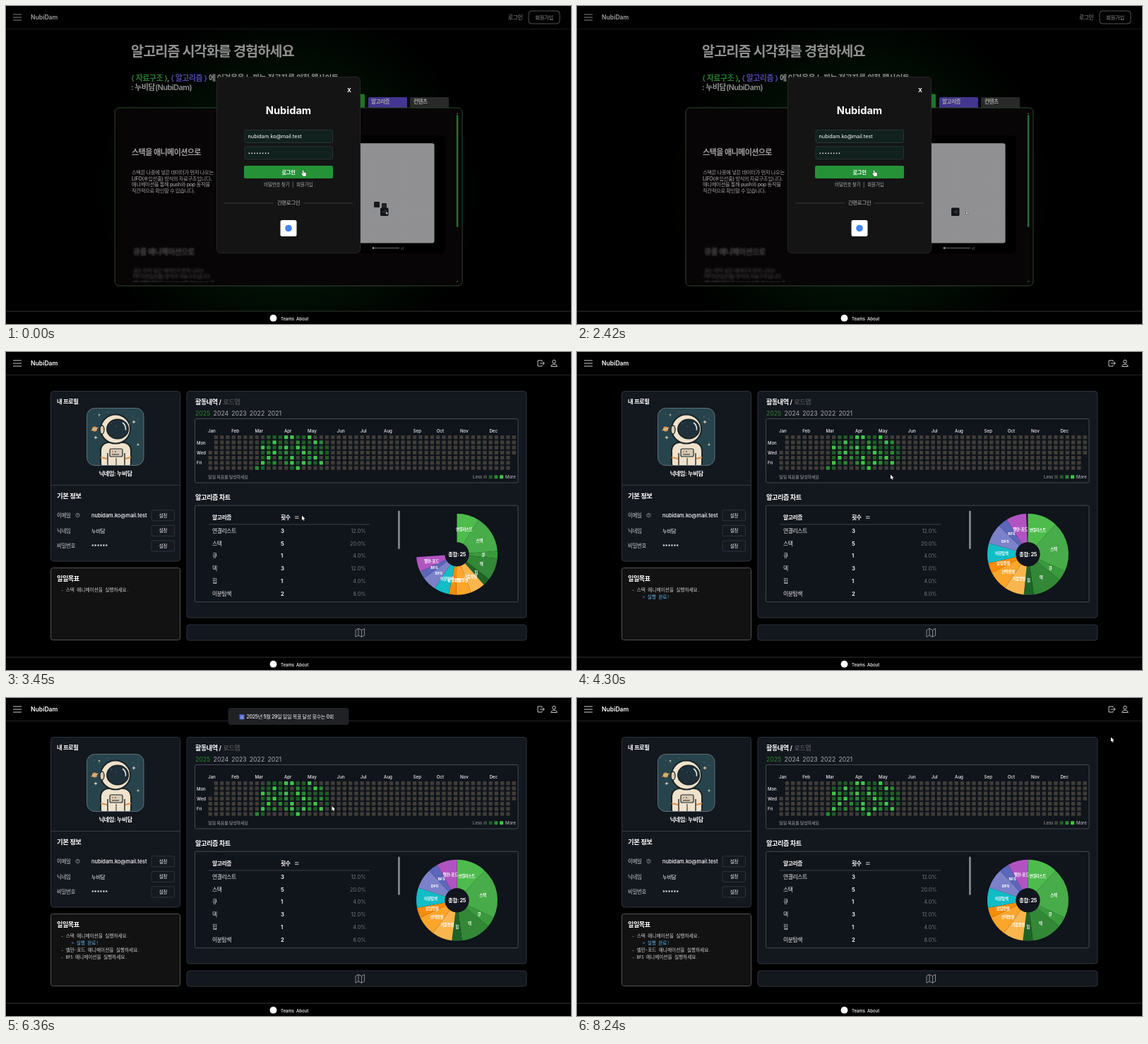
An HTML page with a canvas that plays this animation: 800 px wide and 450 px high, repeating every 8.36 s.

```html
<!DOCTYPE html>
<html lang="ko">
<head>
<meta charset="utf-8">
<style>
html, body { margin: 0; width: 100%; height: 100%; overflow: hidden; background: #000; }
canvas { display: block; width: 800px; height: 450px; }
</style>
</head>
<body>
<canvas id="stage"></canvas>
<script>
const LOOP = 8360, LOCKED_AT = 2580, OPEN_AT = 2880;
const BRAND = 'NubiDam', MAIL = 'nubidam.ko@mail.test', NICK = '누비담';
const SANS = 'Inter, "Noto Sans CJK KR", "Noto Sans CJK", sans-serif';
const MONO = '"Noto Sans Mono CJK KR", "Noto Sans CJK KR", monospace';
const dpr = window.devicePixelRatio || 1;

function surface(canvas) {
  canvas.width = 800 * dpr;
  canvas.height = 450 * dpr;
  const ctx = canvas.getContext('2d');
  ctx.scale(dpr, dpr);
  return ctx;
}
const main = surface(document.getElementById('stage'));
const buffer = surface(document.createElement('canvas'));
let c = main;

const clamp = v => Math.max(0, Math.min(1, v));
const span = (t, a, b) => clamp((t - a) / (b - a));
const easeOut = p => 1 - (1 - p) ** 3;
const easeInOut = p => p < 0.5 ? 4 * p ** 3 : 1 - (2 - 2 * p) ** 3 / 2;

function text(s, x, y, size, color = '#fff', weight = 400, align = 'left') {
  c.font = `${weight} ${size}px ${SANS}`;
  c.letterSpacing = /[가-힣]/.test(s) ? `${-0.05 * size}px` : '0px';
  c.textAlign = align;
  c.fillStyle = color;
  c.fillText(s, x, y);
}

function box(x, y, w, h, r, fill, stroke, width = 1) {
  c.beginPath();
  c.roundRect(x, y, w, h, r);
  if (fill) { c.fillStyle = fill; c.fill(); }
  if (stroke) { c.strokeStyle = stroke; c.lineWidth = width; c.stroke(); }
}

function line(points, color, width = 1) {
  c.beginPath();
  points.forEach(([x, y]) => c.lineTo(x, y));
  c.strokeStyle = color;
  c.lineWidth = width;
  c.stroke();
}

function disc(x, y, rx, fill, stroke, ry = rx, width = 1) {
  c.beginPath();
  c.ellipse(x, y, rx, ry, 0, 0, 7);
  if (fill) { c.fillStyle = fill; c.fill(); }
  if (stroke) { c.strokeStyle = stroke; c.lineWidth = width; c.stroke(); }
}

function header(member) {
  for (const y of [12, 16, 20]) line([[10, y], [22, y]], '#b8b8b8', 1.1);
  text(BRAND, 35, 19, 8.6, '#fff', 600);
  line([[0, 32.5], [800, 32.5]], '#262626');
  if (!member) {
    text('로그인', 711, 19, 7.7, '#e4e4e4');
    box(740, 7, 44, 18, 4, null, '#a5a5a5', 0.8);
    text('회원가입', 762, 18.8, 7.4, '#e4e4e4', 400, 'center');
    return;
  }
  line([[759, 13.5], [759, 12], [753, 12], [753, 20], [759, 20], [759, 18.5]], '#ddd', 0.9);
  line([[756, 16], [762, 16]], '#ddd', 0.9);
  line([[760, 14], [762.3, 16], [760, 18]], '#ddd', 0.9);
  disc(776, 13.6, 2.3, null, '#ddd', 2.3, 0.9);
  c.beginPath();
  c.moveTo(771.8, 20.5);
  c.bezierCurveTo(771.8, 16.2, 780.2, 16.2, 780.2, 20.5);
  c.closePath();
  c.stroke();
}

function footer() {
  line([[0, 432], [800, 432]], '#333');
  disc(378.5, 441.7, 4.9, '#fff');
  text('Teams', 389, 444.5, 6, '#fff', 500);
  text('About', 411, 444.5, 6, '#fff', 500);
}

function hand(x, y) {
  c.shadowColor = '#000';
  c.shadowBlur = 1.5;
  box(x - 0.9, y, 1.8, 6.5, 0.9, '#fff');
  box(x - 1, y + 3, 5.2, 5.6, 1.6, '#fff');
  line([[x - 1.8, y + 4.2], [x, y + 7]], '#fff', 1.5);
  c.shadowBlur = 0;
}

function arrow(x, y, k = 1) {
  const shape = [[0, 0], [0, 6.2], [1.4, 5], [2.4, 7.3], [3.5, 6.8], [2.5, 4.7], [4.4, 4.5]];
  c.beginPath();
  shape.forEach(([dx, dy]) => c.lineTo(x + dx * k, y + dy * k));
  c.closePath();
  c.strokeStyle = '#111';
  c.lineWidth = 0.8;
  c.stroke();
  c.fillStyle = '#fff';
  c.fill();
}

/* ---- landing page with login dialog ---- */

function preview(t) {
  box(490, 183, 132, 167, 7, '#000');
  box(490, 194.3, 116.5, 141.2, 3, '#919193');
  c.fillStyle = '#8a8a8c';
  for (let y = 198; y < 334; y += 3)
    for (let x = 503; x < 605; x += 3) c.fillRect(x, y, 0.8, 0.8);
  const p = easeInOut(span(t, 250, 900));
  c.globalAlpha = 1 - p;
  box(521 + 9 * p, 277 + 9 * p, 8, 8, 1, '#19191b');
  box(532, 279 + 7 * p, 7, 7, 1, '#222226');
  c.globalAlpha = 1;
  box(530, 285.5, 11.5, 11.5, 1.5, '#111317');
  text('<||', 535.7, 293.4, 5, '#777', 400, 'center');
  arrow(538.5 + 12.5 * p, 291, 0.55);
  line([[519, 342.5], [557, 342.5]], '#555', 1.4);
  disc(520, 342.5, 1.3, '#aaa');
  text('x1', 559, 344.5, 4.6, '#777');
}

function landing(t) {
  const glow = c.createRadialGradient(400, 260, 60, 400, 260, 270);
  glow.addColorStop(0, '#031a08');
  glow.addColorStop(0.6, '#010a03');
  glow.addColorStop(1, '#000');
  c.fillStyle = glow;
  c.fillRect(0, 33, 800, 399);
  c.globalAlpha = 0.64;
  header(false);
  c.globalAlpha = 1;

  const gray = '#909090';
  text('알고리즘 시각화를 경험하세요', 177, 71, 19.7, gray, 600);
  text('{ 자료구조 }', 177, 105.8, 11, '#287a30', 600);
  text(',', 228, 105.8, 11, gray, 600);
  text('{ 알고리즘 }', 233, 105.8, 11, '#5145a6', 600);
  text('에 어려움을 느끼는 전공자를 위한 웹사이트', 287, 105.8, 11, gray, 600);
  text(`: ${NICK}(${BRAND})`, 177, 119, 11, gray, 600);

  box(450, 124.5, 58, 24, 2, '#1d7528');
  box(513, 129, 55, 20, 2, '#43368f');
  box(572, 129, 55, 20, 2, '#292929');
  text('알고리즘', 517, 138.4, 7.5, '#a5a5a5', 600);
  text('컨텐츠', 577, 138.4, 7.5, '#a5a5a5', 600);
  box(154, 144, 492, 252, 6, '#080506', '#2b4630');

  text('스택을 애니메이션으로', 178, 211, 11, '#a0a0a0', 600);
  ['스택은 나중에 넣은 데이터가 먼저 나오는', 'LIFO(후입선출) 방식의 자료구조입니다.',
    '애니메이션을 통해 push와 pop 동작을', '직관적으로 확인할 수 있습니다.']
    .forEach((s, i) => text(s, 178, 238.2 + i * 8.6, 7.3, '#a2a2a2', 500));

  c.save();
  c.beginPath();
  c.rect(160, 330, 138, 61);
  c.clip();
  c.filter = 'blur(0.8px)';
  text('큐를 애니메이션으로', 180, 351.5, 10.8, '#4c4c4c', 600);
  ['큐는 먼저 넣은 데이터가 먼저 나오는', 'FIFO(선입선출) 방식의 자료구조입니다.',
    '애니메이션으로 enqueue와 dequeue 과']
    .forEach((s, i) => text(s, 180, 376.5 + i * 8.6, 7.1, '#505050'));
  c.restore();

  box(637.8, 154, 2.6, 159, 1.3, '#256d37');
  text('▴', 639, 152.5, 4, '#777', 400, 'center');
  text('▾', 639, 391, 4, '#777', 400, 'center');
  preview(t);
  footer();
  dialog();
  hand(420.6, 232.5);
}

function dialog() {
  box(298.5, 100.5, 203, 249, 5, '#141415', '#262627');
  text('X', 486, 121.6, 8, '#fff', 700, 'center');
  text('Nubidam', 400, 153, 14.6, '#fff', 700, 'center');
  box(338, 175.5, 124.5, 18, 2, '#10211e', '#2c3b39', 0.8);
  box(338, 198.8, 124.5, 18, 2, '#10211e', '#2c3b39', 0.8);
  text(MAIL, 342.5, 187.2, 7.3);
  for (let i = 0; i < 8; i++) disc(344.2 + i * 3.9, 208.3, 0.85, '#fff');
  box(337, 226, 126, 18, 2, '#269238');
  text('로그인', 400, 238, 7.2, '#fff', 700, 'center');
  text('비밀번호 찾기', 365, 255, 6.7, '#aaa');
  text('|', 405, 255, 6.7, '#aaa');
  text('회원가입', 411, 255, 6.7, '#aaa');
  line([[309, 279], [379, 279]], '#444', 0.8);
  line([[421, 279], [491, 279]], '#444', 0.8);
  text('간편로그인', 400, 281.4, 7.4, '#bbb', 400, 'center');
  box(388.5, 303, 23, 23, 2.5, '#fff');
  disc(400, 314.5, 4.8, '#4285f4');
}

/* ---- profile page ---- */

function lock(x, y, k, color) {
  c.beginPath();
  c.moveTo(x - 5 * k, y);
  c.lineTo(x - 5 * k, y - 5 * k);
  c.arc(x, y - 5 * k, 5 * k, Math.PI, 0);
  c.lineTo(x + 5 * k, y);
  c.strokeStyle = color;
  c.lineWidth = 2.6 * k;
  c.stroke();
  box(x - 9 * k, y - 2 * k, 18 * k, 14 * k, 2 * k, color);
  disc(x, y + 3.6 * k, 1.7 * k, '#15181c');
  c.fillRect(x - 0.8 * k, y + 4 * k, 1.6 * k, 4 * k);
}

function sparkle(x, y, r, color = '#e9dcc0') {
  c.beginPath();
  for (let i = 0; i < 8; i++) {
    const a = i * Math.PI / 4, d = i % 2 ? r * 0.3 : r;
    c.lineTo(x + d * Math.sin(a), y - d * Math.cos(a));
  }
  c.fillStyle = color;
  c.fill();
}

function avatar(open) {
  const ink = '#1c2529', cream = '#efe2cc';
  c.save();
  box(114.5, 79.5, 80.5, 81, 11, '#27434c');
  c.clip();
  box(134, 128, 43, 40, 11, cream, ink, 2);
  line([[144, 161], [144, 143]], ink, 1.4);
  line([[168, 161], [168, 143]], ink, 1.4);
  line([[134, 149], [143, 151]], '#dc8d4f', 2);
  line([[169, 151], [177, 149]], '#dc8d4f', 2);
  box(147, 137, 18, 11, 2, '#d8cbb5', ink, 1.2);
  disc(151, 141, 1.1, '#d9793d');
  disc(155, 141, 1.1, '#3d7483');
  line([[150, 145], [160, 145]], ink);
  line([[156, 150], [156, 161]], ink);
  disc(155, 109, 21, cream, ink, 20.5, 2);
  disc(136, 110, 3, '#d8cbb5', ink, 6, 1.3);
  disc(158, 109, 15, '#20303a', ink, 13.5, 2);
  c.beginPath();
  c.arc(158, 109, 11.5, -0.9, 0.15);
  c.strokeStyle = '#dce4e2';
  c.lineWidth = 1.7;
  c.stroke();
  disc(125.5, 109, 3.6, '#d99a55');
  line([[120.5, 111], [130.5, 107]], '#efcf99', 1);
  if (!open) {
    c.fillStyle = 'rgba(31,38,41,.86)';
    c.fillRect(114, 79, 82, 83);
    disc(125.5, 109, 3, null, '#677075');
  }
  [[132, 89, 2], [181, 99, 3], [127, 121, 3], [187, 131, 2.5]].forEach(s => sparkle(...s));
  for (let i = 0; i < 11; i++)
    disc(118 + (i * 31) % 74, 84 + (i * 17) % 27, 0.5, '#9aa69f');
  c.restore();
  box(114.5, 79.5, 80.5, 81, 11, null, '#667881', 0.9);
}

const LEVELS = ['#403d39', '#205b28', '#2b8834', '#40c44b'];
const ACTIVITY = ['0011133113000', '0113110211320', '0321231321111',
  '0123121132121', '0130213012301', '0312023132130', '2100001300000'];

function activity(open) {
  'Jan Feb Mar Apr May Jun Jul Aug Sep Oct Nov Dec'.split(' ').forEach((m, i) => {
    const week = [0, 4, 8, 13, 17, 22, 26, 30, 35, 39, 43, 48][i];
    text(m, 286 + week * 8.3, 114, 6.2, '#eee', open ? 500 : 700);
  });
  ['Mon', 'Wed', 'Fri'].forEach((d, i) => text(d, 270, 130.5 + i * 14.2, 6, '#eee', 500));
  for (let week = 0; week < 53; week++) {
    for (let day = 0; day < 7; day++) {
      if ((week === 0 && day < 3) || (week === 52 && day > 3)) continue;
      const level = open ? +(ACTIVITY[day][week - 8] || 0) : 0;
      box(286.5 + week * 8.27, 118 + day * 7.23, 5.3, 5.3, 0.8, LEVELS[level]);
    }
  }
  text('일일 목표를 달성하세요', 286, 179, 6.2, '#a5a5a5');
  text('Less', 661, 179, 6, '#a5a5a5');
  LEVELS.forEach((col, i) => box(676 + i * 7.7, 174.3, 5, 5, 0.8, col));
  text('More', 707, 179, 6, '#ccc');
}

const ROWS = [['연결리스트', 3], ['스택', 5], ['큐', 1], ['덱', 3], ['힙', 1], ['이분탐색', 2]];

function table(open) {
  text('알고리즘', 292, 237, 7.8, '#fff', 700);
  text('횟수', 389, 236.5, 7.8, '#fff', 700);
  line([[409, 232.8], [414.5, 232.8]], '#ddd', 0.9);
  line([[409, 235.3], [414.5, 235.3]], '#ddd', 0.9);
  line([[287, 244], [515, 244]], '#454a52', 0.8);
  ROWS.forEach(([name, n], i) => {
    const y = 256 + i * 17.7, count = open ? n : 0;
    text(name, 292, y, 7.8, '#eee', open ? 500 : 600);
    text(count, 389, y, 7.8, '#fff', 600);
    text((count * 4).toFixed(1) + '%', 509.5, y, 7.3, '#777', 400, 'right');
  });
}

const SLICES = [['연결리스트', 3, '#4dbc4c'], ['스택', 5, '#48ac4a'], ['큐', 1, '#3a9a3d'],
  ['덱', 3, '#328836'], ['힙', 1, '#1f6327'], ['거품정렬', 2, '#f9b64e'],
  ['선택정렬', 2, '#fba52b'], ['삽입정렬', 1, '#f98c08'], ['이분탐색', 2, '#12bdc6'],
  ['DFS', 2, '#7b82ca'], ['BFS', 1, '#5c66ba'], ['벨만-포드', 2, '#b154c2']];

function pie(t) {
  const grow = 1 - (1 - span(t, OPEN_AT, OPEN_AT + 2000)) ** 4;
  const x = 638.5, y = 286.3, unit = grow * Math.PI * 2 / 25;
  const labels = [];
  let a = -Math.PI / 2;
  for (const [name, n, color] of SLICES) {
    const end = a + n * unit, mid = (a + end) / 2;
    c.beginPath();
    c.arc(x, y, 57.5, a, end);
    c.arc(x, y, 17, end, a, true);
    c.fillStyle = color;
    c.fill();
    labels.push([name, x + 37.2 * Math.cos(mid), y + 37.2 * Math.sin(mid) + 2]);
    a = end;
  }
  for (const [name, lx, ly] of labels) text(name, lx, ly, 5.4, '#fff', 700, 'center');
  disc(x, y, 17, '#11151d');
  text('총합: 25', x, 289, 7.4, '#fff', 700, 'center');
}

function blurred(draw) {
  c = buffer;
  c.clearRect(0, 0, 800, 450);
  draw(false);
  c = main;
  c.save();
  c.filter = 'blur(1.1px)';
  c.globalAlpha = 0.58;
  c.drawImage(buffer.canvas, 0, 0, 800, 450);
  c.restore();
}

function profile(open) {
  box(63.5, 55.5, 183, 240.5, 4, '#13171e', '#2e343c');
  text('내 프로필', 72, 73, 8.3, '#fff', 600);
  avatar(open);
  text(open ? `닉네임: ${NICK}` : '닉네임:', 155, 175, 8.3, '#fff', 600, 'center');
  line([[64, 188.5], [246, 188.5]], '#363c45');
  text('기본 정보', 72, 207, 9.4, '#fff', 600);
  [['이메일', MAIL], ['닉네임', open ? NICK : ''], ['비밀번호', '******']].forEach(([label, value], i) => {
    const y = 234 + i * 21.6;
    text(label, 72, y, 7.5, '#ccc');
    text(value, 121, y + (i === 2 ? 1 : 0), 7.4, '#fff', 500);
    box(206, y - 10.2, 32.5, 15, 2, open ? '#14181f' : '#222426', open ? '#373c45' : '#36393c', 0.8);
    text('설정', 222.2, y - 0.2, 6.7, open ? '#eee' : '#77797b', 400, 'center');
  });
  disc(101.5, 231, 2.7, null, '#bbb', 2.7, 0.6);
  text('?', 101.5, 232.8, 4.6, '#ccc', 400, 'center');
}

const GOALS = [
  ['- 스택 애니메이션을 실행하세요.', 78, 2880, 28],
  ['> 실행 완료!', 93, 3850, 30],
  ['- 벨만-포드 애니메이션을 실행하세요.', 78, 4580, 30],
  ['- BFS 애니메이션을 실행하세요.', 78, 5880, 24]
];

function goals(t, open) {
  box(63.5, 305.5, 183, 102, 3, '#121212', '#545454');
  text('일일목표', 72, 324, 9.1, '#fff', 600);
  if (!open) return lock(111, 320, 0.38, '#999');
  GOALS.forEach(([s, x, start, step], i) => {
    const n = Math.floor((t - start) / step);
    if (n <= 0) return;
    const shown = s.slice(0, n), y = 339 + i * 10;
    c.font = `${i === 1 ? 500 : 400} 6.65px ${MONO}`;
    c.letterSpacing = '0px';
    c.textAlign = 'left';
    c.fillStyle = i === 1 ? '#62b6f2' : '#d0d0d0';
    c.fillText(shown, x, y);
    if (n <= s.length) c.fillRect(x + c.measureText(shown).width + 1.5, y - 5.5, 1, 6.5);
  });
  if (t > 6360 && (t - 6360) % 940 >= 220) {
    c.fillStyle = '#d0d0d0';
    c.fillRect(182.5, 363, 1, 7);
  }
}

function mapIcon() {
  const x = 495, y = 392;
  line([[x, y + 1.5], [x + 4, y - 0.7], [x + 8.5, y + 1.5], [x + 12.5, y - 0.7], [x + 12.5, y + 9],
    [x + 8.5, y + 11.2], [x + 4, y + 9], [x, y + 11.2], [x, y + 1.5]], '#aaa', 0.8);
  line([[x + 4, y - 0.7], [x + 4, y + 9]], '#aaa', 0.8);
  line([[x + 8.5, y + 1.5], [x + 8.5, y + 11.2]], '#aaa', 0.8);
}

function toast(t) {
  const shown = easeOut(span(t, 5450, 5750)) * (1 - easeInOut(span(t, 6800, 7050)));
  if (!shown) return;
  c.save();
  c.translate(0, -40 * (1 - shown));
  c.globalAlpha = shown;
  box(314.5, 14, 171, 24, 4, '#202125');
  box(330.5, 23.2, 7, 7.4, 1, '#5468c8');
  line([[332, 26], [336, 26]], '#b5c2f5', 0.8);
  line([[332, 28.2], [336, 28.2]], '#b5c2f5', 0.8);
  text('2025년 5월 29일 일일 목표 달성 횟수는 0회', 340.5, 29.3, 7.1, '#eee', 500);
  c.restore();
}

const PATH = [[3480, 4320, 25, -58], [4450, 5050, 17.5, -20.5], [6700, 7680, 294.5, -97.5]];

function pointer(t) {
  let x = 419, y = 231.5;
  for (const [a, b, dx, dy] of PATH) {
    const p = easeInOut(span(t, a, b));
    x += dx * p;
    y += dy * p;
  }
  arrow(x, y);
}

function dashboard(t) {
  const open = t >= OPEN_AT;
  header(open);
  footer();
  profile(open);
  goals(t, open);

  box(256, 55.5, 481, 320.5, 4, '#13171e', '#2e343c');
  text('활동내역 /', 268, 73.5, 9.1, '#fff', 600);
  text('로드맵', 307.5, 73.5, 9.1, '#666');
  for (let i = 0; i < 5; i++)
    text(2025 - i, 268 + i * 25.6, 90, 8.7, i ? '#aaa' : '#2d842f');
  box(267.5, 94.5, 457.5, 90.5, 2, '#10141b', '#4b515b', 0.9);
  text('알고리즘 차트', 268, 209, 9.2, '#fff', 600);
  box(267.5, 217.2, 457.5, 136.5, 2, '#10141b', '#4b515b', 0.9);
  if (open) {
    activity(true);
    table(true);
    box(555, 224.5, 2.8, 54.5, 1.4, '#858585');
    pie(t);
  } else {
    blurred(activity);
    blurred(table);
    lock(496, 139.5, 0.97, '#aaa');
    lock(496, 285.5, 0.97, '#aaa');
  }
  box(256, 386, 481, 22, 4, '#13171e', '#2e343c');
  mapIcon();
  toast(t);
  if (open) pointer(t);
  else hand(420.6, 232);
}

function frame() {
  const t = performance.now() % LOOP;
  c.fillStyle = '#000';
  c.fillRect(0, 0, 800, 450);
  if (t < LOCKED_AT) landing(t);
  else dashboard(t);
  requestAnimationFrame(frame);
}
frame();
</script>
</body>
</html>
```
